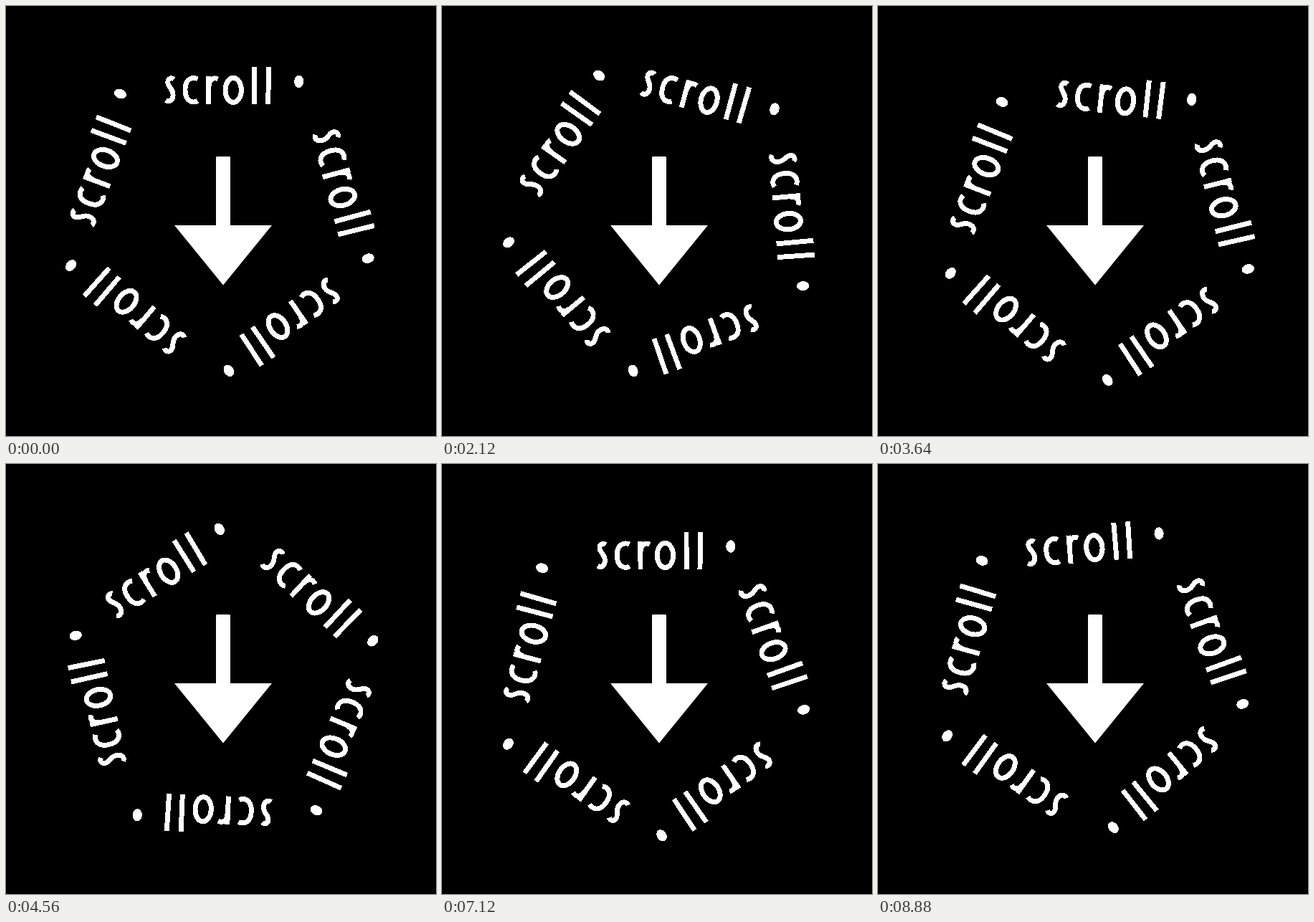
Animation of 600x600 px, one loop 8920 ms. Source, as an HTML page:

```html
<!DOCTYPE html>
<html lang="en">
<head>
<meta charset="utf-8">
<title>Scroll badge</title>
<style>
  html, body { margin: 0; width: 100%; height: 100%; overflow: hidden; background: #000; }
  svg { display: block; width: 100vw; height: 100vh; }
  #ring { shape-rendering: crispEdges; }
  .pen { fill: none; stroke: #fff; stroke-width: 6.9; }
  .solid { fill: #fff; }
</style>
</head>
<body>
<svg viewBox="0 0 600 600" role="img" aria-label="scroll, arrow pointing down">
  <defs>
    <!-- Condensed lettering: the origin is the middle of the "s" -->
    <g id="word">
      <g class="pen">
        <path d="M5.2-14.8C1-17.8-3.6-15.5-3.4-10C-3.2-4 4-1.5 3.9 7C3.8 14.8-1.5 17.8-6.2 14.6"/>
        <path d="M38.2-15.2C32-18 20.8-17 20.8 0S32 19 38.2 15.4"/>
        <path d="M53.5 20V-19.5M54-5C54.5-14 59-18.5 66.5-15"/>
        <ellipse cx="88" cy=".4" rx="11.2" ry="17.1"/>
        <path d="M117.7-32V20M137.6-31.8L136.4 20.2"/>
      </g>
      <ellipse class="solid" cx="179.5" cy="-11.6" rx="6.6" ry="8.7"/>
    </g>
  </defs>
  <g id="ring"></g>
  <path class="solid" d="M294 210H312L313 211V306H371L303 389.5L235 306H293V211Z"/>
</svg>
<script>
  const LOOP = 8920, STEP = 40, TURN = 9000;

  // x, y and angle of each word
  const words = [
    [229.2, 117, 0],
    [447.2, 181.9, 74.9],
    [452.3, 397.6, 145.5],
    [234.8, 469.6, 220.4],
    [108, 294.9, 290.3]
  ];

  const ring = document.getElementById('ring');
  for (const [x, y, angle] of words) {
    const use = document.createElementNS('http://www.w3.org/2000/svg', 'use');
    use.setAttribute('href', '#word');
    use.setAttribute('transform', `translate(${x} ${y}) rotate(${angle})`);
    ring.append(use);
  }

  // The loop ends just short of a full turn, so it snaps back at the end.
  const begin = performance.now();
  function draw() {
    const t = (performance.now() - begin) % LOOP;
    const held = Math.floor(t / STEP) * STEP;
    ring.setAttribute('transform', `rotate(${held / TURN * 360} 300 300)`);
    requestAnimationFrame(draw);
  }
  draw();
</script>
</body>
</html>
```
